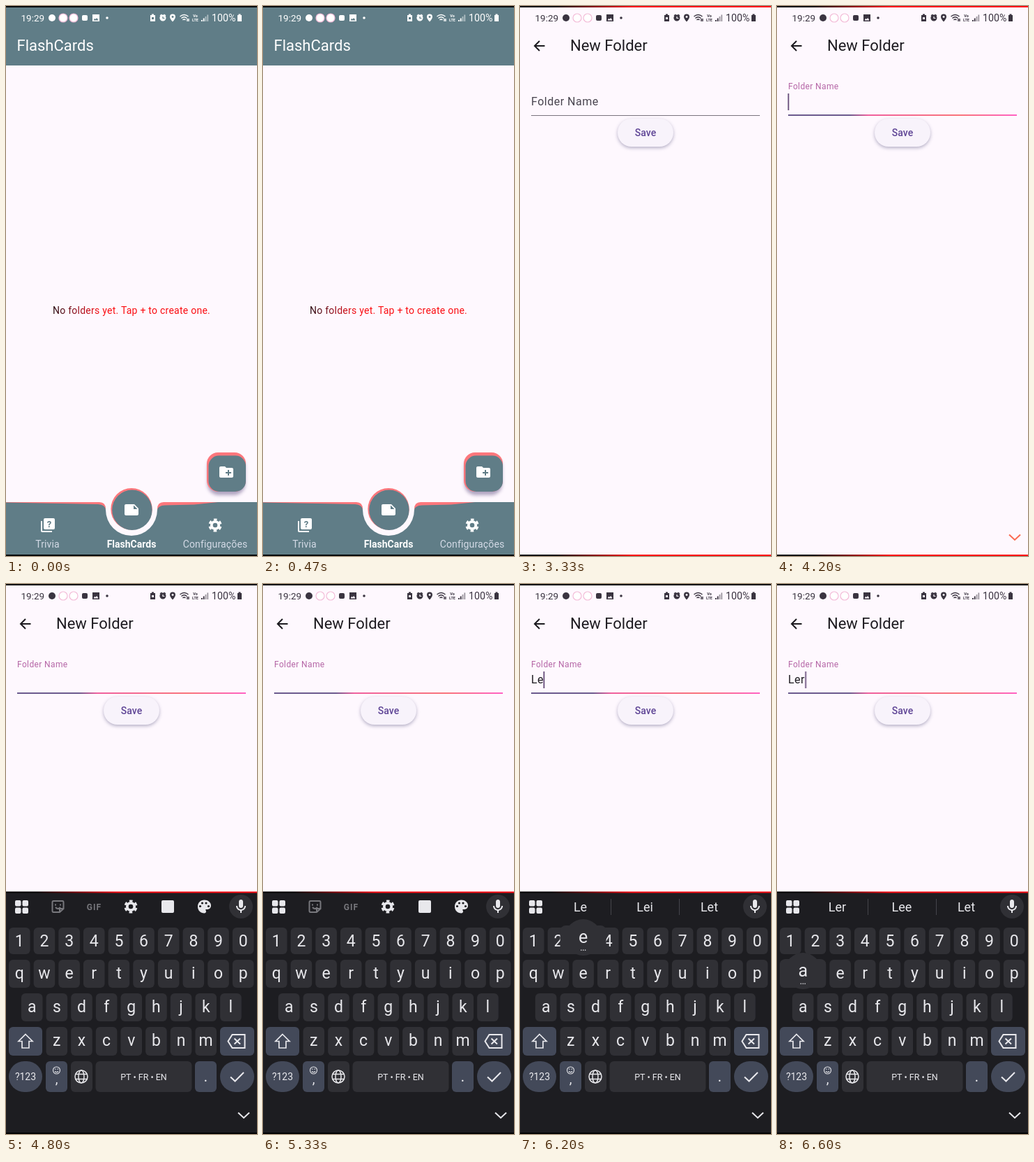
These frames come from a looping animation (360x786 px, 6670 ms). An HTML page:

```html
<!DOCTYPE html>
<html lang="pt">
<head>
<meta charset="utf-8">
<title>FlashCards</title>
<style>
html, body { margin: 0; width: 100%; height: 100%; overflow: hidden; background: #fef8fe; }
svg { display: block; }
#stage { width: 100vw; height: 100vh; font-family: Roboto, sans-serif; }
.mid { text-anchor: middle; }
.line { fill: none; stroke: currentColor; stroke-width: 2; }
.bar { fill: #607d87; }
.glow { fill: #fd777c; }
.key { fill: #303035; }
.mod { fill: #434959; }
#kb { color: #e8e8ec; }
#kb text { fill: #e8e8ec; }

/* every cue shares one 6670 ms clock */
.cue, #status, #cursor { animation: 6670ms step-end infinite; }
.move { animation: 6670ms linear infinite; }
#home, #page { transform-origin: 180px 393px; }
#home { animation-name: leave; }
#page { animation-name: enter; }
#ripple { animation-name: ripple; transform-origin: 316px 666px; }
#label { animation-name: label; }
#focus { animation-name: focus; transform-origin: 180px 156px; }
#kb { animation-name: slide; }
#status { animation-name: ink; }
#cursor { animation-name: blink, caret; }
#hint { animation-name: hint; }
#arrow { animation-name: arrow; }
#edge { animation-name: edge; }
#tools { animation-name: tools; }
.w1 { animation-name: w1; }
.w2 { animation-name: w2; }
.w3 { animation-name: w3; }
.pL { animation-name: pL; }
.pe { animation-name: pe; }
.pr { animation-name: pr; }
.pa { animation-name: pa; }

@keyframes ripple {
  0%, 43.6% { opacity: 0; transform: scale(.2); }
  43.9% { opacity: .22; transform: scale(.3); }
  46.5% { opacity: .22; transform: scale(1); }
  48.5%, 100% { opacity: 0; transform: scale(1); }
}
@keyframes leave {
  0%, 45.7% { transform: none; animation-timing-function: cubic-bezier(.2, 0, 0, 1); }
  49.9%, 100% { transform: scale(1.05); }
}
@keyframes enter {
  0%, 45.7% { opacity: 0; transform: scale(.85); animation-timing-function: cubic-bezier(.2, .4, .2, 1); }
  47.6% { opacity: 1; transform: scale(.96); animation-timing-function: ease-out; }
  49.9%, 100% { opacity: 1; transform: none; }
}
@keyframes ink { 0% { color: #fff; } 47.4%, 100% { color: #3a3440; } }
@keyframes label {
  0%, 58.7% { transform: translate(16px, 142px); fill: #49454f; animation-timing-function: cubic-bezier(.4, 0, .2, 1); }
  61.9%, 100% { transform: translate(16px, 118.5px) scale(.75); fill: #b566a6; }
}
@keyframes focus {
  0%, 58.7% { transform: scaleX(0); animation-timing-function: cubic-bezier(.4, 0, .2, 1); }
  61.9%, 100% { transform: none; }
}
@keyframes slide {
  0%, 63.2% { transform: translateY(346px); animation-timing-function: cubic-bezier(.1, .6, .2, 1); }
  67.9%, 100% { transform: none; }
}
@keyframes blink {
  0% { opacity: 0; } 58.9% { opacity: 1; } 66.4% { opacity: 0; }
  73.9% { opacity: 1; } 79.9% { opacity: 0; } 88.9%, 100% { opacity: 1; }
}
@keyframes caret {
  0% { transform: none; } 88.9% { transform: translateX(9px); }
  92.9% { transform: translateX(18px); } 97%, 100% { transform: translateX(24.5px); }
}
@keyframes hint { 0% { opacity: 0; } 61.9%, 100% { opacity: 1; } }
@keyframes arrow { 0% { opacity: 0; } 64.9%, 100% { opacity: 1; } }
@keyframes edge { 0% { opacity: 0; } 47.4% { opacity: 1; } 64.9%, 100% { opacity: 0; } }
@keyframes tools { 0% { opacity: 1; } 88.9%, 100% { opacity: 0; } }
@keyframes w1 { 0% { opacity: 0; } 88.9% { opacity: 1; } 92.9%, 100% { opacity: 0; } }
@keyframes w2 { 0% { opacity: 0; } 92.9% { opacity: 1; } 97%, 100% { opacity: 0; } }
@keyframes w3 { 0% { opacity: 0; } 97%, 100% { opacity: 1; } }
@keyframes pL { 0% { opacity: 0; } 86.9% { opacity: 1; } 89.9%, 100% { opacity: 0; } }
@keyframes pe { 0% { opacity: 0; } 91% { opacity: 1; } 93.4%, 100% { opacity: 0; } }
@keyframes pr { 0% { opacity: 0; } 94.9% { opacity: 1; } 97%, 100% { opacity: 0; } }
@keyframes pa { 0% { opacity: 0; } 98.9%, 100% { opacity: 1; } }
</style>
</head>
<body>
<svg id="stage" viewBox="0 0 360 786">
  <defs>
    <linearGradient id="warm" gradientUnits="userSpaceOnUse" x1="67" x2="293">
      <stop stop-color="#2a0d14"/><stop offset=".14" stop-color="#8c1220"/><stop offset=".3" stop-color="#fb0d12"/>
    </linearGradient>
    <linearGradient id="rule" gradientUnits="userSpaceOnUse" x1="16" x2="344">
      <stop stop-color="#6b5a8e"/><stop offset=".27" stop-color="#6b5a8e"/><stop offset=".35" stop-color="#f0609e"/>
      <stop offset=".75" stop-color="#f9747a"/><stop offset="1" stop-color="#ff62c4"/>
    </linearGradient>
    <linearGradient id="rim" gradientUnits="userSpaceOnUse" x1="0" x2="360">
      <stop offset=".12"/><stop offset=".45" stop-color="#fa0a10"/>
    </linearGradient>
    <filter id="soft" x="-30%" y="-30%" width="160%" height="170%"><feGaussianBlur stdDeviation="2.5"/></filter>
    <clipPath id="fabClip"><rect x="288" y="638" width="56" height="56" rx="16"/></clipPath>
    <g id="gear" fill="none" stroke="currentColor">
      <circle r="5.2" stroke-width="3.8"/>
      <circle r="8.1" stroke-width="3" stroke-dasharray="4.5 3.98" stroke-dashoffset="-2"/>
    </g>
  </defs>

  <g id="home" class="move">
    <rect width="360" height="786" fill="#fef8fe"/>
    <rect class="bar" width="360" height="85"/>
    <text x="15.5" y="64" font-size="22" fill="#fff">FlashCards</text>
    <text class="mid" x="180" y="439.5" font-size="14" letter-spacing=".25" fill="url(#warm)">No folders yet. Tap + to create one.</text>

    <rect x="289" y="643" width="54" height="56" rx="16" fill="#7a6a96" opacity=".6" filter="url(#soft)"/>
    <rect class="glow" x="288" y="638" width="56" height="56" rx="16"/>
    <rect class="bar" x="290.5" y="642.5" width="53.5" height="51.5" rx="15"/>
    <g clip-path="url(#fabClip)"><circle id="ripple" class="move" cx="316" cy="666" r="40" fill="#fff"/></g>
    <path transform="translate(304 654)" fill="#fff" d="M20 6h-8l-2-2H4c-1.1 0-2 .9-2 2v12c0 1.1.9 2 2 2h16c1.1 0 2-.9 2-2V8c0-1.1-.9-2-2-2zm-1 8h-3v3h-2v-3h-3v-2h3V9h2v3h3z"/>

    <path class="glow" d="M0 709H134Q143 709 143 719L138 724H0ZM304 709H226Q217 709 217 719L222 724H304Z"/>
    <path class="bar" d="M0 709.5L132 712Q142 712.5 143 720A37 37 0 0 0 217 720Q218 714 228 713.5L270 712.5L304 709H360V786H0Z"/>
    <circle class="glow" cx="180" cy="718.8" r="29.7"/>
    <circle class="bar" cx="180.9" cy="720.3" r="28.7"/>
    <path transform="translate(168 708)" fill="#fff" d="M22 10l-6-6H4c-1.1 0-2 .9-2 2v12c0 1.1.9 2 2 2h16c1.1 0 2-.9 2-2zm-7-4.5l5.5 5.5H15z"/>
    <g transform="translate(48 730)" fill="#fff">
      <path d="M4 6H2v14c0 1.1.9 2 2 2h14v-2H4z"/><rect x="6" y="2" width="16" height="16" rx="2"/>
      <text class="mid bar" x="14" y="14.8" font-size="13" font-weight="700">?</text>
    </g>
    <use href="#gear" x="300" y="742" color="#fff"/>
    <g class="mid" font-size="14" fill="#d3dae6">
      <text x="59.5" y="774" letter-spacing=".1">Trivia</text>
      <text x="180" y="774" font-weight="700" fill="#fff">FlashCards</text>
      <text x="300" y="774" letter-spacing=".15">Configurações</text>
    </g>
  </g>

  <g id="page" class="move">
    <rect width="360" height="786" fill="#fef8fe"/>
    <path class="line" color="#1d1b20" d="M35.5 57H21.5M28 50L21 57L28 64"/>
    <text x="72" y="64" font-size="22" fill="#1d1b20">New Folder</text>
    <text id="label" class="move" font-size="16" letter-spacing=".5">Folder Name</text>
    <rect x="16" y="156" width="328" height="1" fill="#79747e"/>
    <rect id="focus" class="move" x="16" y="155" width="328" height="2" fill="url(#rule)"/>
    <g font-size="16" letter-spacing=".5" fill="#1d1b20">
      <text class="cue w1" x="16" y="142">L</text>
      <text class="cue w2" x="16" y="142">Le</text>
      <text class="cue w3" x="16" y="142">Ler</text>
    </g>
    <rect id="cursor" x="15.5" y="125" width="1.8" height="24" fill="#654a78"/>
    <rect x="140" y="163" width="80" height="40" rx="20" fill="#6d6890" opacity=".5" filter="url(#soft)"/>
    <rect x="140" y="161" width="80" height="40" rx="20" fill="#f8f3fb"/>
    <text class="mid" x="180" y="186" font-size="14" font-weight="500" letter-spacing=".1" fill="#5f4596">Save</text>
    <path id="hint" class="line cue" color="#fb6a52" stroke-width="1.6" d="M333 755.5L341 763L349 755.5"/>
  </g>

  <g id="kb" class="move">
    <rect y="440" width="360" height="346" fill="#1d1d21"/>
    <rect y="439.5" width="360" height="2" fill="url(#rim)"/>
    <g fill="currentColor">
      <rect x="13" y="452" width="8.5" height="8.5" rx="2"/><rect x="23.5" y="452" width="8.5" height="8.5" rx="2"/>
      <rect x="13" y="462.5" width="8.5" height="8.5" rx="2"/><rect x="23.5" y="462.5" width="8.5" height="8.5" rx="2"/>
    </g>
    <circle class="key" cx="337" cy="461" r="17"/>
    <path transform="translate(325 449)" fill="currentColor" d="M12 14c1.7 0 3-1.3 3-3V5c0-1.7-1.3-3-3-3S9 3.3 9 5v6c0 1.7 1.3 3 3 3zM17 11c0 2.8-2.2 5-5 5s-5-2.2-5-5H5c0 3.5 2.6 6.4 6 6.9V21h2v-3.1c3.4-.5 6-3.4 6-6.9z"/>
    <g id="tools" class="cue">
      <g color="#77777c">
        <path class="line" stroke-width="1.6" d="M68 453H81Q82.5 453 82.5 455V464L77 469H68Q66.5 469 66.5 467V455Q66.5 453 68 453ZM82 464H77V469M71 462Q74.5 466 78 462"/>
        <path class="line" d="M71 457.5V459.5M78 457.5V459.5"/>
      </g>
      <text class="mid" x="126.5" y="465.5" font-size="12" font-weight="700" letter-spacing="1" style="fill:#77777c">GIF</text>
      <use href="#gear" x="179" y="461"/>
      <rect x="223" y="452" width="18" height="18" rx="2" fill="currentColor"/>
      <path transform="translate(272.5 449)" fill="currentColor" d="M12 2.5C6.5 2.5 2.5 6.5 2.5 12s4 9.5 9.5 9.5c1.4 0 2.5-1.1 2.5-2.5 0-.6-.2-1.2-.6-1.7-.4-.6 0-1.3.6-1.3H16c3.3 0 5.5-2.2 5.5-5.5 0-4.5-4.5-8-9.5-8z"/>
      <g fill="#1d1d21"><circle cx="278.5" cy="460.5" r="1.6"/><circle cx="281.5" cy="456" r="1.6"/><circle cx="287" cy="456" r="1.6"/><circle cx="290.5" cy="460.5" r="1.6"/></g>
    </g>
    <g id="words" class="mid" font-size="18"></g>
    <g id="keys" class="mid" font-size="23"></g>
    <g class="line">
      <path stroke-width="1.7" d="M28 643.5L38 653.5H33V663H23V653.5H18Z"/>
      <path d="M324.5 644H342.5V663H324.5L318.5 653.5ZM327.5 649.5L336 657.5M336 649.5L327.5 657.5"/>
      <path d="M322 704.5L328.5 710.5L341 698"/>
      <g stroke-width="1.5">
        <circle cx="108" cy="704" r="9"/><ellipse cx="108" cy="704" rx="4" ry="9"/><path d="M100 700.5H116M100 707.5H116"/>
      </g>
      <g stroke-width="1.1"><circle cx="72.5" cy="695" r="5"/><path d="M70 696.5Q72.5 699 75 696.5M70.8 692.5V694M74.2 692.5V694"/></g>
    </g>
    <g id="pops" class="mid" font-size="25"></g>
  </g>
  <path id="arrow" class="line cue" color="#e8e8ec" stroke-width="1.6" d="M333 755.5L341 763L349 755.5"/>

  <g id="status">
    <g fill="currentColor">
      <text x="21.5" y="22" font-size="13.5">19:29</text>
      <circle cx="66" cy="17" r="5"/>
      <g fill="#fff" stroke="#f3bcd8" stroke-width="1.2"><circle cx="82" cy="17" r="6"/><circle cx="97" cy="17" r="6"/></g>
      <rect x="109" y="13" width="8" height="8" rx="2"/>
      <path fill-rule="evenodd" d="M124 12h10v10h-10zM125.5 20.5h7l-2.2-3.5-1.8 2-1.2-1.2z"/>
      <circle cx="145" cy="17" r="1.8"/>
      <path fill-rule="evenodd" d="M207 13h2v-1.5h3V13h2v9h-7zM209 16v3h3v-3z"/>
      <path fill-rule="evenodd" d="M225 12.5a4.5 4.5 0 1 1-.1 0zM224.4 15v3h3v-1h-1.8v-2z"/>
      <path d="M221 14l2.5-2M229 14l-2.5-2" stroke="currentColor" stroke-width="1.5"/>
      <path fill-rule="evenodd" d="M239 22.5q-4-4.5-4-7a4 4 0 0 1 8 0q0 2.5-4 7zM239 14a1.5 1.5 0 1 0 .1 0z"/>
      <g class="mid" font-size="5.5" font-weight="700"><text x="271.5" y="16">Vo</text><text x="271.5" y="21.5">LTE</text></g>
      <path d="M280 22v-2h1.8v2zM282.8 22v-4.5h1.8v4.5z"/>
      <path opacity=".5" d="M285.6 22v-7h1.8v7zM288.4 22v-9.5h1.8v9.5z"/>
      <text x="295" y="22" font-size="14.2">100%</text>
      <path d="M332 13h1.5v-1.5h3V13h1.5v9h-6z"/>
    </g>
    <path class="line" style="stroke-width:1.4" d="M249.5 15Q255.5 10 261.5 15M251.5 17.5Q255.5 14 259.5 17.5M253.5 20Q255.5 18 257.5 20M260 18V22M262 22V18"/>
  </g>

  <path d="M0 0H360V2H0ZM0 784H360V786H0Z"/>
  <path id="edge" class="cue" fill="url(#rim)" d="M0 0H360V2H0ZM0 784H360V786H0Z"/>
</svg>
<script>
const $ = id => document.getElementById(id);
const tops = [491, 537, 585, 633, 682], heights = [38, 40, 40, 41, 44];
const step = 35.65;

const box = (x, w, row, cls = 'key', r = 6) =>
  `<rect class="${cls}" x="${x}" y="${tops[row]}" width="${w}" height="${heights[row]}" rx="${r}"/>`;
const text = (x, y, s, size = '') => `<text x="${x}" y="${y}"${size && ` font-size="${size}"`}>${s}</text>`;

const rows = [['1234567890', 19.3, 518], ['qwertyuiop', 19.3, 564], ['asdfghjkl', 37.2, 612], ['zxcvbnm', 72.8, 660]];
let keys = '';
rows.forEach(([chars, x0, base], row) => [...chars].forEach((c, i) => {
  const x = x0 + i * step;
  keys += box(x - 15.3, 30.6, row) + text(x, base, c);
}));
keys += box(4, 48, 3, 'mod') + box(307, 49, 3, 'mod')
  + box(4, 48, 4, 'mod', 22) + text(28, 709, '?123', 14)
  + box(57, 31, 4, 'mod') + text(72.5, 714, ',', 19)
  + box(93, 31, 4)
  + box(128.5, 138, 4) + text(197.5, 708.5, 'PT • FR • EN', 12.5)
  + box(271, 31, 4, 'mod') + text(286.5, 711, '.', 22)
  + box(307, 49, 4, 'mod', 22);
$('keys').innerHTML = keys;

const guesses = [['L', 'Le', 'La'], ['Le', 'Lei', 'Let'], ['Ler', 'Lee', 'Let']];
$('words').innerHTML = guesses.map((set, i) =>
  `<g class="cue w${i + 1}">${set.map((s, j) => text(86.5 + j * 92.5, 467.5, s)).join('')}
   <path d="M130.5 450V473M228.5 450V473" stroke="#45454b"/></g>`).join('');

// key preview bubble above the pressed key
const pop = (c, x, row, more) => {
  const y = tops[row] - 32;
  return `<g class="cue p${c}"><circle class="key" cx="${x}" cy="${y}" r="26"/>
    <rect class="key" x="${x - 33}" y="${y - 17}" width="66" height="41" rx="8"/>
    ${text(x, y + 8, c)}${more ? text(x, y + 19, '…', 14) : ''}</g>`;
};
$('pops').innerHTML = pop('L', 322.5, 2) + pop('e', 90.6, 1, true) + pop('r', 126.2, 1) + pop('a', 37.2, 2, true);
</script>
</body>
</html>
```
